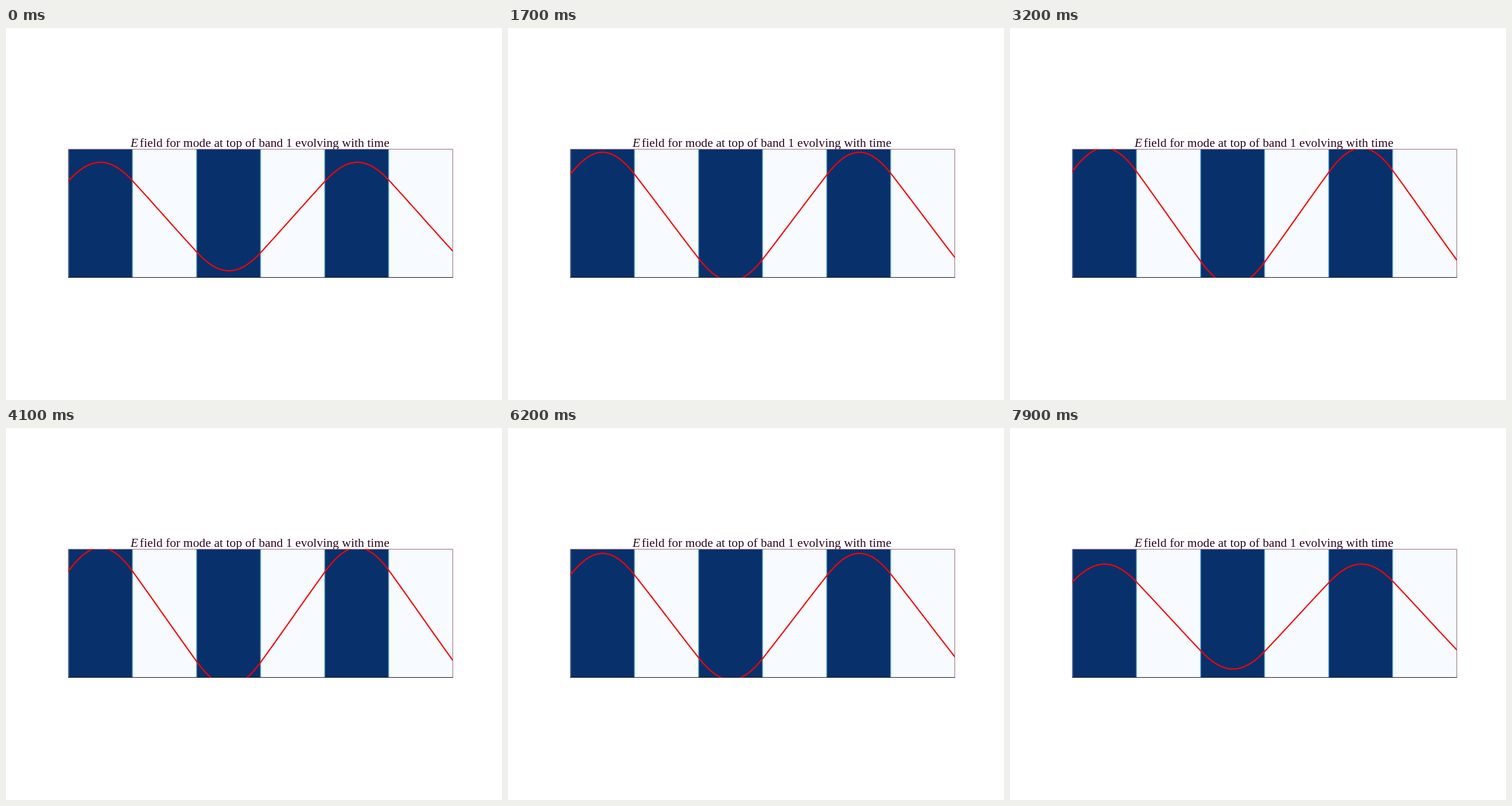
An HTML page that plays this animation: 864 px wide and 648 px high, repeating every 8 s.

```html
<!DOCTYPE html>
<html lang="en">
<head>
<meta charset="utf-8">
<title>Field mode</title>
<style>
  html, body { margin: 0; width: 100%; height: 100%; overflow: hidden; background: #fff; }
  svg { display: block; width: 100vw; height: 100vh; }
  text { font: 21.7px "Liberation Serif", "Noto Serif", serif; fill: #2e0620; }
  .frame { fill: none; stroke-width: 1; }
</style>
</head>
<body>
<svg viewBox="0 0 864 648">
  <defs>
    <clipPath id="box"><rect x="108.5" y="211" width="669.7" height="223.5"/></clipPath>
  </defs>
  <text y="206.6"><tspan x="217" font-style="italic">E</tspan> <tspan x="233">field for mode at top of band 1 evolving with time</tspan></text>
  <rect x="108.5" y="211" width="669.7" height="223.5" fill="#f7fbff"/>
  <g id="layers" clip-path="url(#box)"></g>
  <path class="frame" stroke="#8f6078" d="M108.5 434V211.2H778.2V434"/>
  <path class="frame" stroke="#141018" d="M108 434.5H778.7"/>
  <path id="wave" clip-path="url(#box)" fill="none" stroke="#f00" stroke-width="2.2" stroke-linejoin="round"/>
</svg>
<script>
const LEFT = 108.8, RIGHT = 778.2, TOP = 211, HEIGHT = 223.5;
const LAYER = (RIGHT - LEFT) / 6, MID_Y = 328.4;
const LOOP = 8000, STEP = 100;

// The curve is sampled on a slightly wider grid than the layers.
const WAVE_LEFT = 108.6, WAVE_LAYER = LAYER * 1.003;

// Phase across half a layer, in the dense and in the light material.
const DENSE = 0.855, LIGHT = 0.24;
const EDGE = Math.cos(DENSE);

function addRect(x, width, fill) {
  const rect = document.createElementNS("http://www.w3.org/2000/svg", "rect");
  const attrs = { x, y: TOP, width, height: HEIGHT, fill };
  for (const key in attrs) rect.setAttribute(key, attrs[key]);
  document.getElementById("layers").append(rect);
}

for (let i = 0; i < 6; i += 2) addRect(LEFT + i * LAYER, LAYER, "#08306b");
for (let i = 0; i < 6; i++) addRect(LEFT + i * LAYER - 0.8, 1.6, "#6baed6");

// Standing wave: cosine in dense layers, joined by shallow sines in light ones.
function field(x) {
  const pos = (x - WAVE_LEFT) / WAVE_LAYER;
  const i = Math.floor(pos);
  const u = 2 * (pos - i) - 1;
  const sign = i % 4 < 2 ? 1 : -1;
  return sign * (i % 2
    ? -EDGE * Math.sin(LIGHT * u) / Math.sin(LIGHT)
    : Math.cos(DENSE * u));
}

const amplitude = seconds => 120 * Math.cos(0.1735 * (seconds - 3.83));

const wave = document.getElementById("wave");

function draw(ms) {
  const amp = amplitude(ms / 1000);
  const points = [];
  for (let x = WAVE_LEFT; x <= RIGHT + 2; x += 2) {
    points.push(x.toFixed(2) + " " + (MID_Y - amp * field(x)).toFixed(2));
  }
  wave.setAttribute("d", "M" + points.join("L"));
}

const start = performance.now();
function tick() {
  const ms = (performance.now() - start) % LOOP;
  draw(Math.floor(ms / STEP) * STEP);
  requestAnimationFrame(tick);
}
tick();
</script>
</body>
</html>
```
